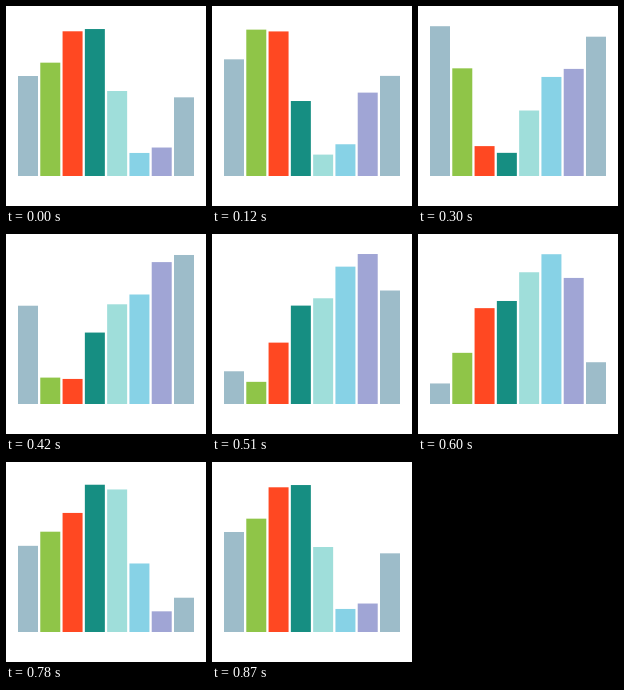
A matplotlib script that plays this animation: 200 by 200 pixels, repeating every 0.9 s.

```python
import numpy as np
import matplotlib.pyplot as plt
from matplotlib.animation import FuncAnimation
from matplotlib.patches import Rectangle

SIZE = 200
FRAMES = 30
INTERVAL = 30
BASE = 170
LEFT, RIGHT, WIDTH = 12, 188, 20
KEYS = [100, 150, 20, 100]  # bar heights at equal thirds of the cycle
COLORS = ["#9dbcc9", "#8fc548", "#ff4822", "#168e82",
          "#9fdeda", "#87d2e6", "#a0a5d5", "#9dbcc9"]

# Cubic Bezier easing (.5, 0, .5, 1), sampled once
S = np.linspace(0, 1, 1001)
EASE_X = 1.5 * S * (1 - S) + S**3
EASE_Y = S * S * (3 - 2 * S)


def height(phase):
    pos = (phase % 1) * 3
    seg = min(int(pos), 2)
    start, end = KEYS[seg], KEYS[seg + 1]
    return start + (end - start) * np.interp(pos - seg, EASE_X, EASE_Y)


fig = plt.figure(figsize=(2, 2), dpi=100, facecolor="white")
ax = fig.add_axes([0, 0, 1, 1])
ax.set_xlim(0, SIZE)
ax.set_ylim(SIZE, 0)
ax.axis("off")

count = len(COLORS)
pitch = (RIGHT - LEFT - WIDTH) / (count - 1)
bars = [
    ax.add_patch(Rectangle((LEFT + i * pitch, BASE), WIDTH, 0,
                           facecolor=color, linewidth=0, snap=False))
    for i, color in enumerate(COLORS)
]


def update(frame):
    # The last frame shows the same pose as the first
    time = frame / (FRAMES - 1)
    for i, bar in enumerate(bars):
        h = height(time + i / count)
        bar.set_y(BASE - h)
        bar.set_height(h)
    return bars


anim = FuncAnimation(fig, update, frames=FRAMES, interval=INTERVAL,
                     repeat=True, repeat_delay=0, blit=False)
plt.show()
```
